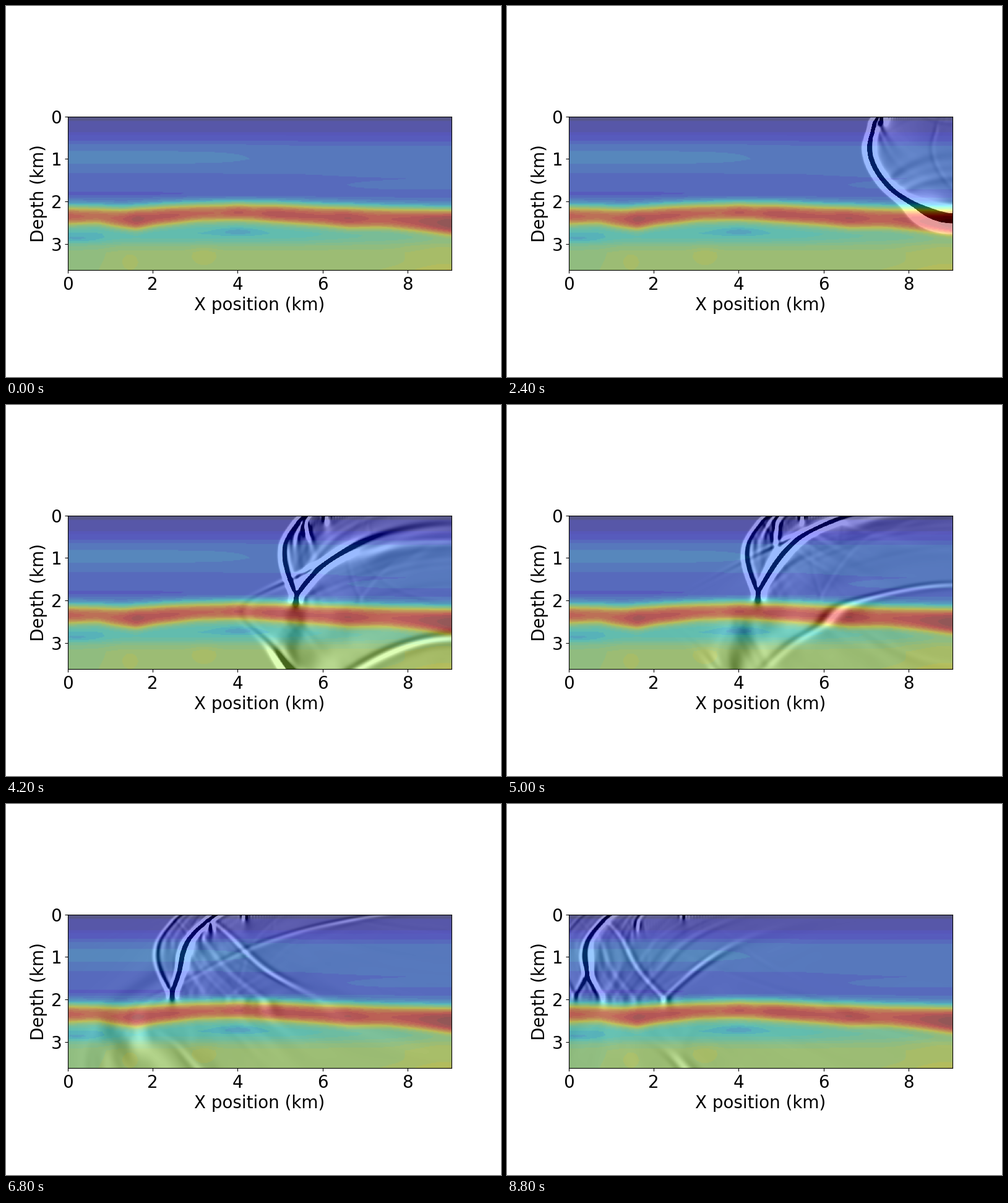
A matplotlib script for the animation above (9 s loop, 800 px wide and 600 px high).

```python
import numpy as np
import matplotlib.pyplot as plt
from matplotlib.animation import FuncAnimation

FRAMES = 45
INTERVAL = 200            # ms
NX, NZ, H = 452, 181, 0.02    # cells and cell size in km
PAD = 40                  # absorbing rim, cells
DT, STEPS = 0.002, 50     # seconds, time steps per picture
F0 = 10.0                 # peak frequency, Hz
SHOT_X, SHOT_Z = 9.0, 0.02    # km


def sigmoid(a):
    return 1 / (1 + np.exp(-np.clip(a, -40, 40)))


def smooth(line, width=15):
    kernel = np.hanning(width + 2)[1:-1]
    padded = np.pad(line, width // 2, mode="edge")
    return np.convolve(padded, kernel / kernel.sum(), "valid")


def along(x, knots, values):
    return smooth(np.interp(x, knots, values))


def make_model():
    """Relative velocity, 0 (water) to 1 (hard layer)."""
    x = np.arange(NX) * H
    z = (np.arange(NZ) * H)[:, None]

    def blob(cx, cz, rx, rz):
        return np.exp(-((x - cx) / rx) ** 2 - ((z - cz) / rz) ** 2)

    shallow = np.interp(
        z,
        [0, .09, .12, .36, .42, .52, .6, .7, 1.0, 1.3, 1.6, 1.85, 2.2],
        [0, 0, .07, .085, .12, .13, .165, .195, .205, .195, .19, .18, .22])
    shallow = shallow + .035 * sigmoid((4.6 - x) / .5) * np.exp(-((z - .95) / .3) ** 2)
    shallow -= .03 * sigmoid((4.8 - x) / .6) * np.exp(-((z - 1.62) / .25) ** 2)
    shallow -= .02 * np.exp(-((z - 1.83) / .06) ** 2)
    shallow += .025 * blob(8.3, 1.63, 1.3, .08)

    deep = np.interp(z, [2.6, 2.75, 2.85, 2.95, 3.05, 3.2, 3.62],
                     [.38, .365, .39, .44, .51, .56, .57])
    deep = deep - .035 * sigmoid((.9 - x) / .15) * sigmoid((z - 2.9) / .08)
    deep += .06 * sigmoid((x - 6.2) / .5) * sigmoid((3.0 - z) / .06)
    deep -= .06 * blob(.2, 2.88, .6, .09)
    deep -= .06 * blob(4.0, 2.7, .5, .1)
    deep += .045 * blob(1.45, 3.4, .17, .16)
    deep += .045 * blob(3.2, 3.25, .28, .2)
    deep += .05 * blob(8.8, 3.2, .8, .42)
    deep += .07 * blob(9.1, 3.66, 1.2, .15)

    top = along(x, [0, .7, 1.3, 2.2, 3, 4, 5, 6, 7, 9],
                [2.14, 2.15, 2.18, 2.12, 2.08, 2.06, 2.08, 2.12, 2.15, 2.2])
    base = along(x, [0, .7, 1.1, 1.6, 2.1, 3, 4, 5, 6, 6.6, 7.5, 8.3, 9],
                 [2.52, 2.50, 2.58, 2.64, 2.55, 2.45, 2.42,
                  2.48, 2.55, 2.6, 2.6, 2.68, 2.77])
    peak = along(x, [0, .7, 1.1, 1.6, 2.0, 2.4, 3, 3.6, 4, 4.35,
                     4.8, 6, 6.6, 7.2, 8, 9.04],
                 [.93, .9, .9, .97, .94, .95, .92, .91, .97, .92,
                  .97, .93, .96, .91, .93, 1.0])
    enter = sigmoid((z - top) / .065)
    inside = sigmoid((base - z) / .055)
    layer = inside * peak + (1 - inside) * deep
    return np.clip(shallow * (1 - enter) + enter * layer, 0, 1)


def make_damping(shape):
    rows, cols = np.indices(shape)
    edge = np.minimum(np.minimum(rows, shape[0] - 1 - rows),
                      np.minimum(cols, shape[1] - 1 - cols))
    depth = np.clip((PAD - edge) / PAD, 0, 1)
    return (.04 * depth ** 2).astype(np.float32)


def simulate(model):
    """Acoustic pressure, one snapshot for each picture."""
    speed = np.pad(1.48 + 3.5 * model, PAD, mode="edge")
    nz, nx = speed.shape
    core = (slice(4, -4), slice(4, -4))
    gain = ((speed * DT / H) ** 2).astype(np.float32)[core]
    gamma = make_damping(speed.shape)[core]
    keep, scale = 1 - gamma, 1 / (1 + gamma)
    weights = [np.float32(w) for w in (8 / 5, -1 / 5, 8 / 315, -1 / 560)]
    centre = np.float32(-205 / 36)

    now = np.zeros((nz, nx), np.float32)
    old = np.zeros_like(now)
    lap = np.empty_like(gain)
    part = np.empty_like(gain)
    shot = PAD + round(SHOT_Z / H), PAD + round(SHOT_X / H)
    view = (slice(PAD, PAD + NZ), slice(PAD, PAD + NX))
    snaps = [now[view].copy()]

    for step in range((FRAMES - 1) * STEPS):
        np.multiply(now[core], centre, out=lap)
        for k, w in enumerate(weights, 1):
            np.add(now[4 + k:nz - 4 + k, 4:-4], now[4 - k:nz - 4 - k, 4:-4], out=part)
            part += now[4:-4, 4 + k:nx - 4 + k]
            part += now[4:-4, 4 - k:nx - 4 - k]
            part *= w
            lap += part
        lap *= gain
        lap += now[core]
        lap += now[core]
        inner = old[core]
        inner *= keep
        np.subtract(lap, inner, out=inner)
        inner *= scale
        a = (np.pi * F0 * (step * DT - 1 / F0)) ** 2
        old[shot] -= (1 - 2 * a) * np.exp(-a)
        now, old = old, now
        if (step + 1) % STEPS == 0:
            snaps.append(now[view].copy())
    return snaps


model = make_model()
snaps = simulate(model)
# Strong clipping, scaled to the early downgoing wave
level = .045 * np.abs(snaps[8][50:80, 430]).max()

plt.rcParams.update({"font.family": "DejaVu Sans", "font.size": 20})
fig, ax = plt.subplots(figsize=(8, 6), dpi=100)
extent = [0, NX * H, NZ * H, 0]
wave = ax.imshow(snaps[0], cmap="gray", vmin=-1.14, vmax=.86, extent=extent)
bands = np.round(model / .035) * .035
ax.imshow(bands, cmap="jet", vmin=0, vmax=1, alpha=.4, extent=extent)
ax.set_xticks([0, 2, 4, 6, 8])
ax.set_yticks([0, 1, 2, 3])
ax.set_xlabel("X position (km)")
ax.set_ylabel("Depth (km)")


def update(i):
    wave.set_data(snaps[i] / level)
    return [wave]


anim = FuncAnimation(fig, update, frames=FRAMES, interval=INTERVAL,
                     repeat=True, repeat_delay=0)
plt.show()
```
